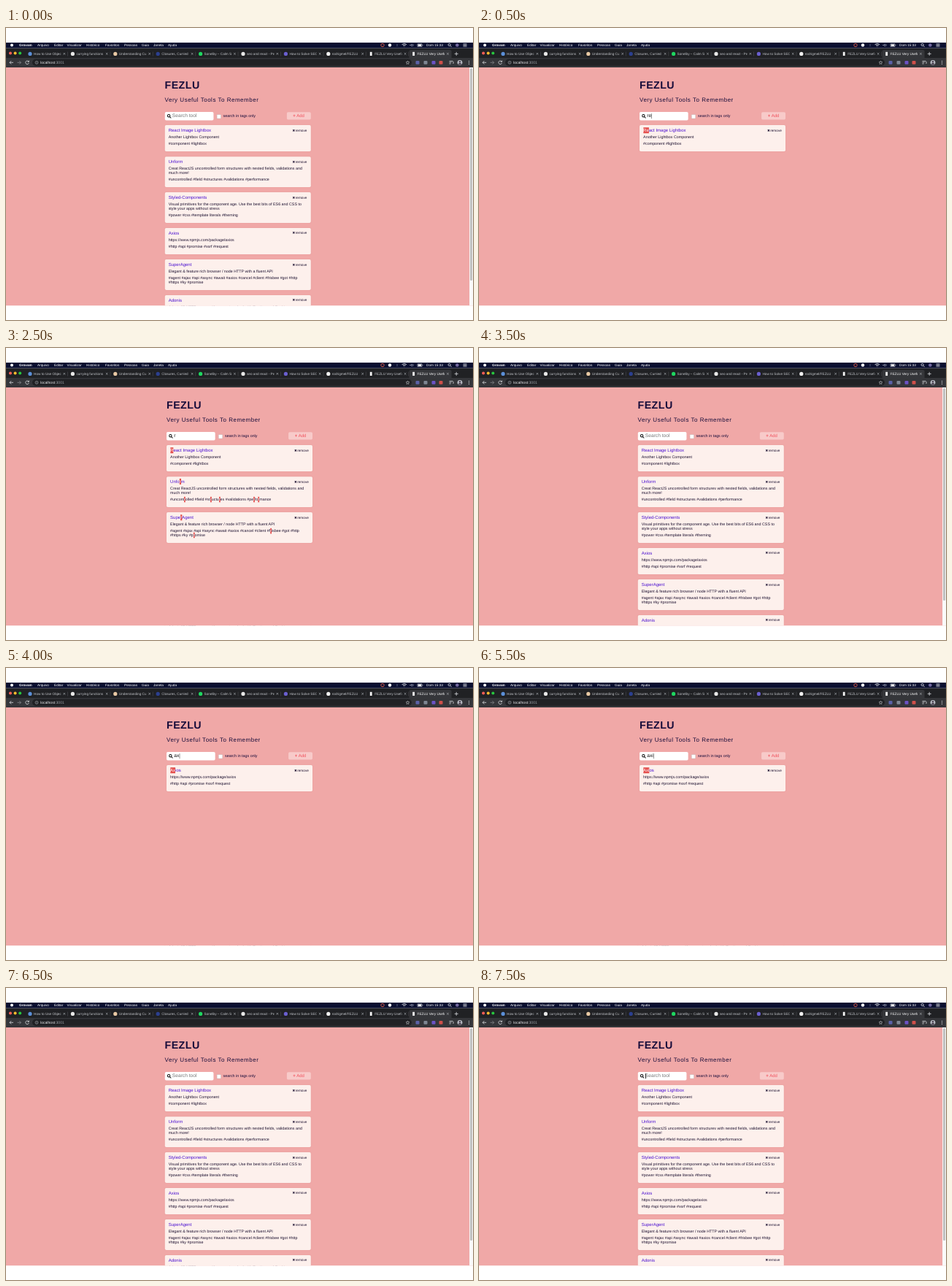
Write an HTML page that moves like this. It is 640x400 px and loops after 8000 ms.

```html
<!DOCTYPE html>
<html lang="pt">
<head>
<meta charset="utf-8">
<style>
html, body { margin: 0; width: 100%; height: 100%; overflow: hidden; background: #fff; }
body { position: relative; font-family: "Liberation Sans", Arial, sans-serif; text-rendering: geometricPrecision; }
#browser { position: absolute; left: 0; top: 0; }
#page {
  position: absolute; left: 0; top: 54px; width: 1440px; height: 733.5px; overflow: hidden;
  transform: scale(.444444); transform-origin: 0 0; background: #f0a8a7; color: #170c3a;
}
#col { position: absolute; top: 0; left: 495px; width: 450px; }
.long #col { left: 489.5px; }
#col > * { position: absolute; white-space: pre; }
h1 { margin: 0; top: 39px; font: bold 32px/32px "Liberation Sans", Arial, sans-serif; letter-spacing: 1px; }
h2 { margin: 0; top: 90px; font: 18px/18px "Liberation Sans", Arial, sans-serif; letter-spacing: 1.15px; }
#search { top: 137px; width: 150px; height: 26px; border-radius: 4px; background: #fff; font-size: 15px; line-height: 26px; }
#search svg { position: absolute; left: 7px; top: 7px; }
#query { position: absolute; left: 23px; color: #111; }
.empty #query { color: #757575; }
#caret { position: absolute; top: 5px; width: 1.6px; height: 16px; background: #111; }
#box { left: 160px; top: 145px; width: 11px; height: 11px; border: 1px solid #bbb; border-radius: 2px; background: #fff; }
#label { left: 180px; top: 143px; font-size: 12px; line-height: 14px; }
#add { left: 376px; top: 138px; width: 74px; height: 23px; border-radius: 4px; background: #f8cac9; color: #f0505c; font-size: 13.5px; line-height: 23px; text-align: center; }
#list { top: 178px; width: 450px; }
.card { position: relative; margin-bottom: 16px; padding: 8px 11.5px 16.25px; border-radius: 4px; background: #fdf0ec; box-shadow: 0 0 3px #d9888880; color: #1c1130; font-size: 12px; line-height: 13.5px; }
.name { font-size: 13.5px; line-height: 16px; color: #4a0fd0; }
.desc { margin: 6px 0 7.5px; }
.remove { position: absolute; right: 11.5px; top: 8px; font-size: 10.6px; line-height: 16px; }
.remove b { font: 10px "DejaVu Sans", sans-serif; margin-right: 1px; }
mark { background: #e4504f; color: #fff; padding: 1.5px 0; }
#bar { display: none; position: absolute; right: 0; top: 0; width: 11px; height: 100%; background: #fafafa; }
.long #bar { display: block; }
#bar i { position: absolute; left: 2px; top: 2px; width: 7px; height: 655px; border-radius: 4px; background: #c1c1c1; }
</style>
</head>
<body>
<svg id="browser" width="640" height="400"></svg>
<div id="page">
  <div id="col">
    <h1>FEZLU</h1>
    <h2>Very Useful Tools To Remember</h2>
    <div id="search"><svg width="13" height="13" fill="none" stroke="#111" stroke-width="2.4"><circle cx="5" cy="5" r="3.8"/><path d="M8 8l4.5 4.5"/></svg><span id="query"></span><i id="caret"></i></div>
    <div id="box"></div>
    <div id="label">search in tags only</div>
    <div id="add"><b>+</b> Add</div>
    <div id="list"></div>
  </div>
  <div id="bar"><i></i></div>
</div>
<script>
const $ = id => document.getElementById(id);

// Browser window
const text = (x, y, s, size = 4.7, fill = "#fff", more = "") =>
  `<text x="${x}" y="${y}" font-size="${size}" fill="${fill}" ${more}>${s}</text>`;
const rect = (x, y, w, h, fill, r = 0) =>
  `<rect x="${x}" y="${y}" width="${w}" height="${h}" rx="${r}" fill="${fill}"/>`;
const dot = (x, y, r, fill) => `<circle cx="${x}" cy="${y}" r="${r}" fill="${fill}"/>`;
const line = (d, color = "#dadce0", w = .8) =>
  `<path d="${d}" fill="none" stroke="${color}" stroke-width="${w}"/>`;

const menus = [["Arquivo", 43], ["Editar", 66], ["Visualizar", 83.5], ["Histórico", 110], ["Favoritos", 136],
  ["Pessoas", 162], ["Guia", 186], ["Janela", 202], ["Ajuda", 222]];
const tabs = [["How to Use Object", "#5b8fd8"], ["currying functions j", "#e8e8e8"], ["Understanding Curr", "#e9c9a5"],
  ["Closures, Curried F", "#2b3f8f"], ["Sonelby – Calm Set 4", "#1ed760"], ["seo and react - Pes", "#e8e8e8"],
  ["How to Solve SEO P", "#6a5fd0"], ["rodrigmel/FEZLU", "#f0f0f0"], ["FEZLU Very Useful"], ["FEZLU Very Useful"]];

function menuBar() {
  return rect(0, 20, 640, 7.5, "#0a0f30") + dot(8, 23.5, 2, "#fff") +
    text(18, 25.2, "Grovam", 4.7, "#fff", 'font-weight="bold"') +
    menus.map(([s, x]) => text(x, 25.2, s)).join("") +
    `<circle cx="516" cy="23.5" r="2.2" fill="none" stroke="#c8584a"/>` + dot(526, 23.5, 2.2, "#fff") +
    line("M535 21.5l2 4M537 21.5l-2 4", "#59607c", .5) +
    line("M542.6 22.6q3.2-2.6 6.4 0M544 24q1.8-1.4 3.6 0M545.4 25.2h.8", "#fff", .8) +
    line("M553 23.5h1.4l1.8-1.6v3.2l-1.8-1.6M557.6 22q1.2 1.5 0 3", "#a9adbf", .7) +
    line("M564 21.8h6v3.6h-6zM571 23v1.2", "#fff", .5) + rect(564.7, 22.4, 4.4, 2.4, "#fff") +
    text(576, 25.2, "Dom 15:33") +
    `<circle cx="607.6" cy="23" r="1.6" fill="none" stroke="#fff" stroke-width=".7"/>` + line("M608.8 24.2l1.7 1.7", "#fff") +
    dot(618.3, 23.5, 2.3, "#73689f") + line("M626.5 21.8h5M626.5 23.5h5M626.5 25.2h5", "#fff", .7);
}

function tab([title, color], i) {
  const x = 28 + 58.4 * i, active = i == tabs.length - 1;
  return (active ? rect(x - 1, 30, 58, 14, "#35363a", 2.5) : line(`M${x + 56.5} 32.5v6`, "#55575c", .5)) +
    (color ? dot(x + 5, 35.4, 2.6, color) : rect(x + 3.6, 32.8, 2.8, 5.2, "#f4f4f4")) +
    `<svg x="${x + 10}" y="28" width="37.5" height="14">${text(0, 9, title, 4.7, active ? "#fff" : "#c4c7cc")}</svg>` +
    line(`M${x + 50.5} 34l2.7 2.7m0-2.7l-2.7 2.7`, "#bdc1c6", .6);
}

function toolbar() {
  const extensions = [["#5b62a8", 564], ["#7f8793", 575], ["#6b52c4", 586], ["#cf4f4a", 596]];
  return rect(0, 41, 640, 13, "#35363a") +
    line("M10 47.3H5m2.2-2.2L5 47.3l2.2 2.2") + line("M15.5 47.3h5m-2.2-2.2l2.2 2.2-2.2 2.2", "#85878b") +
    line("M31 46a2.3 2.3 0 1 0 .3 2M31.4 44.6v1.8h-1.8") +
    rect(36, 42.6, 520, 9.4, "#202124", 4.7) +
    `<circle cx="42" cy="47.3" r="2" fill="none" stroke="#bdc1c6" stroke-width=".5"/>` + line("M42 46.8v1.6M42 46v.4", "#bdc1c6", .5) +
    text(47, 49, 'localhost<tspan fill="#9aa0a6">:3001</tspan>', 5.1, "#e8eaed") +
    line("M550.5 45l.7 1.6 1.7.1-1.3 1.2.4 1.7-1.5-.9-1.5.9.4-1.7-1.3-1.2 1.7-.1z", "#dadce0", .5) +
    extensions.map(([c, x]) => rect(x - 2.5, 45, 5, 4.8, c, 1)).join("") +
    line("M607.5 45.4h5M607.5 47.2h3M607.5 49h2M613 46v3") +
    dot(622, 47.3, 3.4, "#b9bcc4") + dot(622, 46.3, 1.3, "#4b4250") +
    `<path d="M619.5 49.6q2.5-3.6 5 0q-2.5 2-5 0" fill="#4b4250"/>` +
    [45.3, 47.3, 49.3].map(y => dot(634.5, y, .6, "#dadce0")).join("");
}

$("browser").innerHTML = rect(0, 27.5, 640, 14, "#202124") + menuBar() +
  ["#ff5f57", "#febc2e", "#28c840"].map((c, i) => dot(6 + 6.6 * i, 34.5, 2, c)).join("") +
  tabs.map(tab).join("") + line("M614.7 35.4h5m-2.5-2.5v5") + toolbar();

// Searchable list
const tools = [
  ["React Image Lightbox", "Another Lightbox Component", "#component #lightbox"],
  ["Unform", "Creat ReactJS uncontrolled form structures with nested fields, validations and\nmuch more!",
    "#uncontrolled #field #structures #validations #performance"],
  ["Styled-Components", "Visual primitives for the component age. Use the best bits of ES6 and CSS to\nstyle your apps without stress",
    "#power #css #template literals #theming"],
  ["Axios", "https://www.npmjs.com/package/axios", "#http #api #promise #xsrf #request"],
  ["SuperAgent", "Elegant &amp; feature rich browser / node HTTP with a fluent API",
    "#agent #ajax #api #async #await #axios #cancel #client #frisbee #got #http\n#https #ky #promise"],
  ["Adonis", "AdonisJS HTTP server with support packed with Routing and Cookies", "#http #http-server"]
];

// One entry per half second; "|" shows the caret
const steps = ["", "re|", "react|", "react|", "rea|", "r", "", "", "ax|", "axios|", "axios|", "axi|", "a|", "", "|", "|"];

function show(step) {
  const query = step.replace("|", "");
  const hit = s => query ? s.replace(RegExp(query, "gi"), "<mark>$&</mark>") : s;
  $("page").className = query ? "" : "long empty";
  $("query").textContent = query || "Search tool";
  $("caret").hidden = !step.includes("|");
  $("caret").style.left = 23.5 + (query ? $("query").offsetWidth : 0) + "px";
  $("list").innerHTML = tools.filter(([name]) => name.toLowerCase().includes(query)).map(([name, desc, tags]) =>
    `<div class="card"><div class="name">${hit(name)}</div><div class="desc">${desc}</div><div>${hit(tags)}</div>` +
    `<div class="remove"><b>✖</b>remove</div></div>`).join("");
}

let shown = -1;
function frame(now) {
  const i = Math.floor(now % 8000 / 500);
  if (i != shown) show(steps[shown = i]);
  requestAnimationFrame(frame);
}
frame(0);
</script>
</body>
</html>
```
